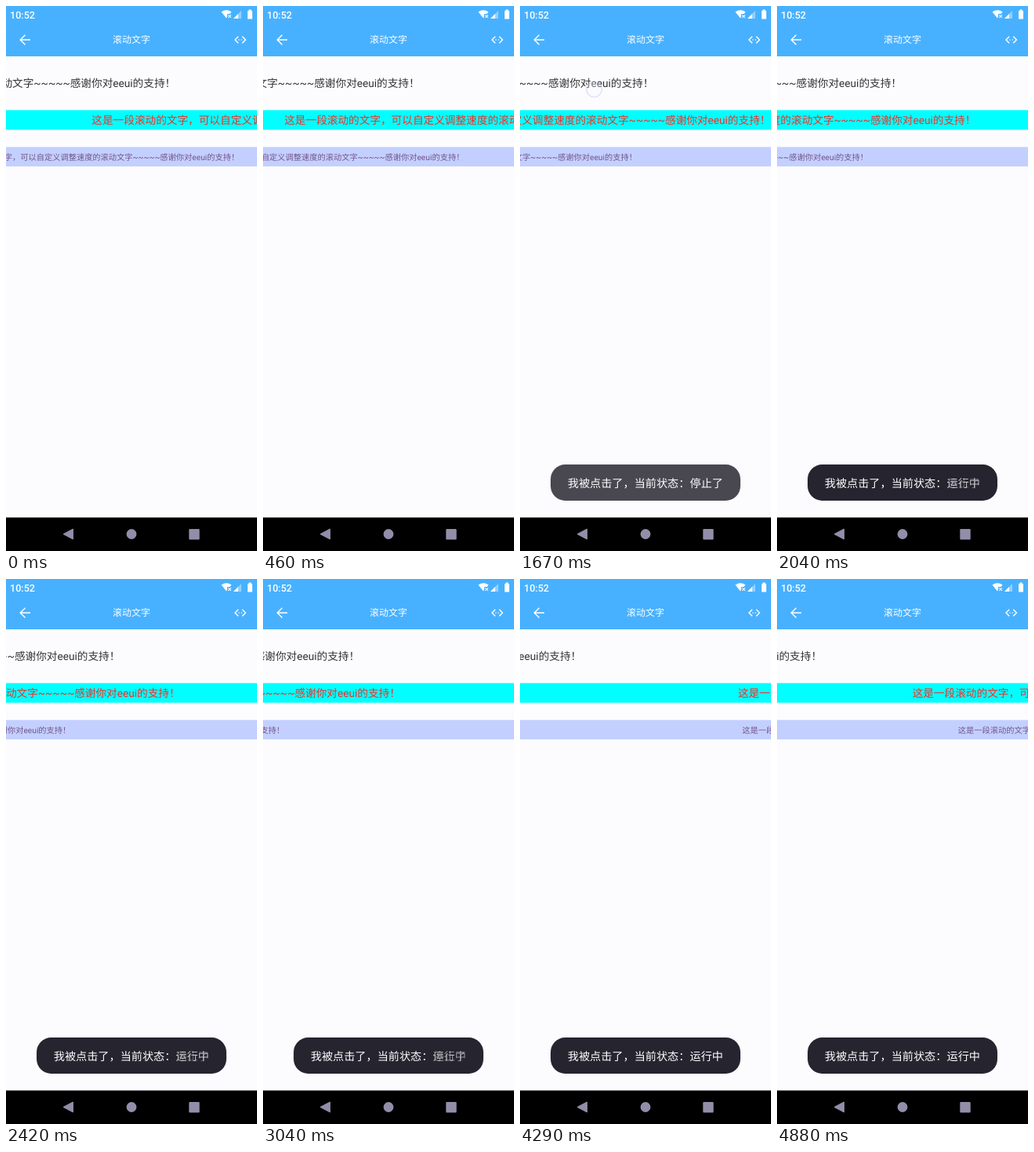
An HTML page for the animation above (4.92 s loop, 320 by 693 pixels).

```html
<!DOCTYPE html>
<html lang="zh-CN">
<head>
<meta charset="utf-8">
<style>
  html, body { margin: 0; height: 100%; overflow: hidden; background: #fcfcff; }
  svg { display: block; width: 320px; height: 693px; }
  text {
    font-family: Roboto, "Noto Sans CJK SC", "Noto Sans CJK", sans-serif;
    white-space: pre;
    text-rendering: geometricPrecision;
  }
</style>
</head>
<body>
<svg viewBox="0 0 320 693">
  <rect width="320" height="693" fill="#fcfcff"/>

  <rect width="320" height="64" fill="#48b1ff"/>
  <g fill="#fff">
    <text x="5" y="15.6" font-size="12.6" font-weight="500">10:52</text>
    <path d="M274.5 7.5Q281 3 287.5 7.5L285.5 10H282V13.5L281 15.5Z"/>
    <path d="M283.3 11.3l3.6 3.6m0-3.6l-3.6 3.6" stroke="#fff" stroke-width="1.1"/>
    <path d="M290 16L300 6V16Z" opacity=".4"/>
    <path d="M290 16L296 10V16Z"/>
    <path d="M308 6h1.5v-1.5h3V6h1.5v10.5h-6z"/>
    <text x="160" y="46.7" font-size="11.95" text-anchor="middle">滚动文字</text>
    <circle cx="296.9" cy="43" r=".8"/><circle cx="300.3" cy="43" r=".8"/>
  </g>
  <g fill="none" stroke="#fff" stroke-width="1.4">
    <path d="M31 43H18.5M24.5 36.7L18.2 43l6.3 6.3"/>
    <path d="M296.2 38.8L292 43l4.2 4.2M301.2 38.8l4.2 4.2-4.2 4.2"/>
  </g>

  <rect y="132.4" width="320" height="25" fill="#0ff"/>
  <rect y="179.3" width="320" height="24.7" fill="#c3d0ff"/>
  <g id="lines"></g>

  <g id="toast" font-size="14.15" font-weight="500" fill="#fff">
    <rect x="39" y="583" width="242" height="46" rx="18.7" fill="#25242f"/>
    <text x="60.8" y="611.6">我被点击了，当前状态：</text>
    <text x="216.5" y="611.6" id="stopped">停止了</text>
    <text x="216.5" y="611.6" id="running">运行中</text>
  </g>

  <circle id="touch" r="9.8" fill="#f4faff" fill-opacity=".8" stroke="#c4bdf0" stroke-width="1.6"/>

  <rect y="650.4" width="320" height="42.6"/>
  <g fill="#928eaa">
    <path d="M73 671.5L85.4 665V678Z" stroke="#928eaa" stroke-linejoin="round"/>
    <circle cx="160" cy="671.5" r="6.4"/>
    <rect x="233.3" y="665" width="13.4" height="13.4" rx="1"/>
  </g>
</svg>
<script>
const LOOP = 4920, ENTRY = 326;
const MESSAGE = '这是一段滚动的文字，可以自定义调整速度的滚动文字~~~~~感谢你对eeui的支持！';

// Speeds in px per second; each line is tapped to stop and again to run.
const lines = [
  { size: 13.65, y: 103.3, color: '#333', start: -292, speed: 35.9, stop: 1278, run: 1725, tap: [94.5, 106] },
  { size: 13.65, y: 150, color: '#f82c24', start: 109.5, speed: 178.5, stop: 2219, run: 2779, tap: [88, 147] },
  { size: 10.24, y: 195.6, color: '#755488', start: -84, speed: 88.8, stop: 3300, run: 3760, tap: [81, 187] },
];

const byId = id => document.getElementById(id);
const clamp = v => Math.max(0, Math.min(1, v));
const smooth = v => v * v * (3 - 2 * v);
const set = (el, attrs) => { for (const k in attrs) el.setAttribute(k, attrs[k]); };

for (const line of lines) {
  line.el = document.createElementNS('http://www.w3.org/2000/svg', 'text');
  line.el.textContent = MESSAGE;
  set(line.el, { y: line.y, fill: line.color, 'font-size': line.size });
  byId('lines').append(line.el);
}

const taps = lines.flatMap(({ stop, run, tap }) => [
  { time: stop, tap, label: 1 },
  { time: run, tap, label: 0 },
]);
const toastFade = (t, click) => clamp((t - click - 60) / 400);
const touchAlpha = (t, click) =>
  Math.min(clamp((t - click + 170) / 30), clamp((click - 30 - t) / 60));

function draw(t) {
  for (const { el, size, start, speed, stop, run } of lines) {
    const width = size * 37.25;
    const moving = t - clamp((t - stop) / (run - stop)) * (run - stop);
    let x = start - speed * moving / 1000;
    if (x < -width) x += ENTRY + width;
    el.setAttribute('x', x);
  }

  let stopped = 1, alpha = 0;
  taps.forEach(({ time, tap, label }, i) => {
    if (i) stopped += (label - stopped) * smooth(toastFade(t, time));
    const a = touchAlpha(t, time);
    if (a > 0) {
      alpha = a;
      set(byId('touch'), { cx: tap[0], cy: tap[1] });
    }
  });
  set(byId('touch'), { opacity: alpha });
  set(byId('toast'), { opacity: toastFade(t, taps[0].time) });
  set(byId('stopped'), { opacity: stopped });
  set(byId('running'), { opacity: 1 - stopped });
}

const begin = performance.now();
function tick() {
  draw((performance.now() - begin) % LOOP);
  requestAnimationFrame(tick);
}
tick();
</script>
</body>
</html>
```
